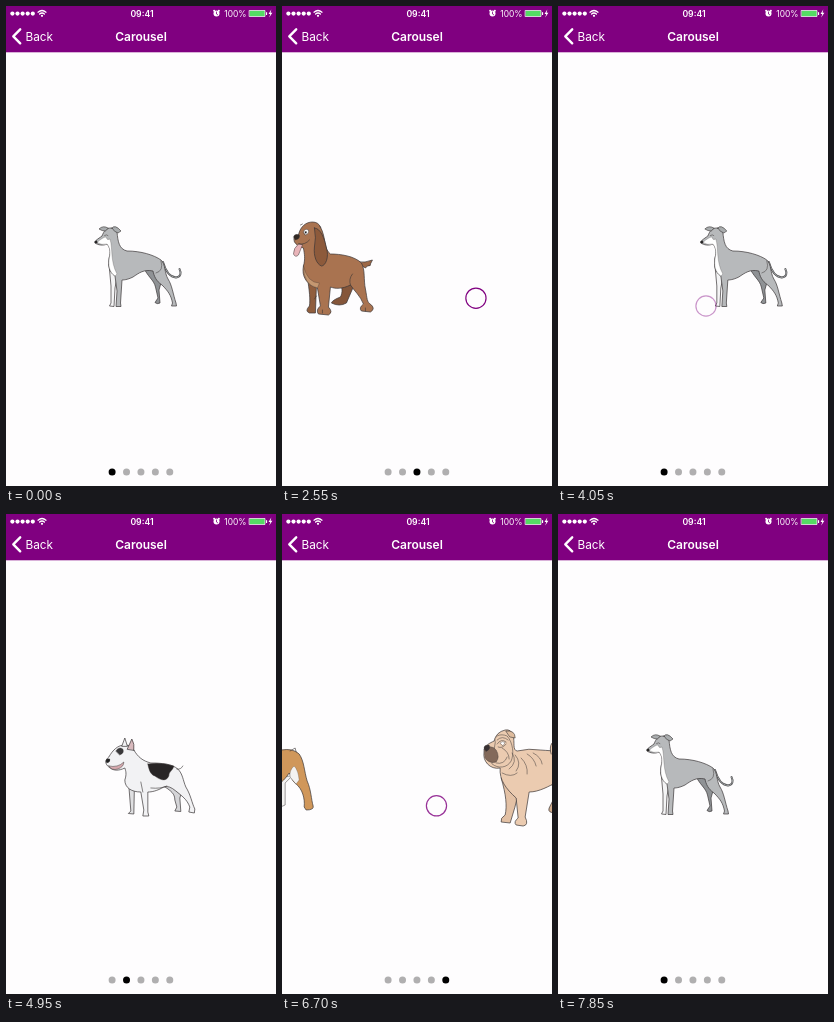
Animation of 270x480 px, one loop 8000 ms. Source, as an HTML page with a canvas:

```html
<!DOCTYPE html>
<html lang="en">
<head>
<meta charset="utf-8">
<title>Carousel</title>
<style>
html, body { margin: 0; width: 100%; height: 100%; overflow: hidden; background: #fefdfe; }
canvas { display: block; width: 100vw; height: 100vh; }
</style>
</head>
<body>
<canvas id="stage"></canvas>
<script>
const W = 270, H = 480, LOOP = 8000;
const PURPLE = '#800080', INK = '#3a3637';
const canvas = document.getElementById('stage');
const ctx = canvas.getContext('2d');

// Each part: [fill, path, line width, line colour]
const greyhound = [
  ['', 'M157 256C159 263 163 271 170 271.5C175 271 175.5 267 173.5 263', 1.9, '#4a4a4c'],
  ['', 'M157 256C159 263 163 271 170 271.5C175 271 175.5 267 173.5 263', .8, '#b4b6b8'],
  ['#f4f4f5', 'M103 258L105 280L105 297L103.5 300L108 300.5L109 282L112 266Z'],
  ['#8f9295', 'M138 262C141 270 148 274 149.5 281L152 292L149 296.5Q151 298.5 154 297L153 284L158 266Z'],
  ['#b7b9bb', 'M111 226C112 236 113 243 121 245C135 245 148 249 155 254C160 259 158 266 162 273C166 279 167 288 170 297L170.5 300L165.5 300L166.5 297C165 289 162 285 156 279C150 275 148 270 147 265C138 263 133 267 127 271C121 274 117 274 116 274L114.5 297L115 300.5L110 300.5L111 285L109 270C103 266 102 260 103 252C105 246 104 241 101 238C97 240 92 239 89 237C88 235 92 233 96 230C98 225 100 222 105 222Q109 222 111 226Z'],
  ['#fff', 'M91 236.5Q97 231 100 231Q101 235 104 233C107 243 104 255 111 268L109 270C103 266 102 259 103.5 251C105 245 103 240 101 238Q96 239.5 91 236.5Z', .25],
  ['#a9acae', 'M102 222Q97 219 93 223Q96 225 99 225Z', .6],
  ['#a9acae', 'M106 222Q109 218 115 225L112 227Q108 226 106 222Z', .6],
  ['#222', 'M89 237Q88 234.5 91 234.8L91.2 237Z', .3],
  ['', 'M98.5 229.5Q100.5 228 102 229.5M155 255Q158 265 150 267', .5]
];

const terrier = [
  ['#dfdfe1', 'M114 272L116 297L113.5 299.5L119 300L119.5 276Z'],
  ['#d5d5d8', 'M147 271C157 277 160 280 160 286L162 293L160 297L166 297.5L165 284L169 271Z'],
  ['#f2f2f4', 'M119 236C123 243 128 247 136 249C147 249 157 250 163 255C168 260 168 266 171 273C176 281 177 289 180 295L179.5 299L174 298L175 293C172 285 167 282 161 277Q154 271 149 273C142 277 137 278 133 278L133 298L134 302L128 302L129 296L126 278C117 278 110 274 110 266C112 260 111 257 110 254C104 257 98 257 94 253C90 250 90 246 94 243C98 236 103 231 110 231Q117 231 119 236Z'],
  ['#f2f2f4', 'M107 232L110 224L112.5 232Z'],
  ['#d8b9bd', 'M112.5 235L117 225Q120 230 119 236Z'],
  ['#282526', 'M133 250Q147 248 159 252C158 257 154 257 154 262C151 269 144 265 140 262C136 261 134 256 133 250Z', .4],
  ['#39383a', 'M101 237Q104 232 108 235Q110 239 105 241Z', .3],
  ['#222', 'M91 247Q91 244 95 245Q96 248 92 249Z', .3],
  ['#d6a8ad', 'M94 252Q103 254 109 248Q109 253 103 255Q97 257 94 252Z', .5],
  ['', 'M162 255Q166 256 168 252M136 274Q146 275 152 272M126 268L128 278', .6]
];

const spaniel = [
  ['#905e3e', 'M112 272C114 285 115 294 114 300Q109 305 114 307L120 307L121 280Z'],
  ['#85563a', 'M143 276C148 281 147 287 145 291Q137 294 136 297Q144 301 151 297L157 283L160 273Z'],
  ['#9d6846', 'M162 256Q170 257 177 254L175 258Q176 260 172 260L170 262L167 260Z'],
  ['#a97350', 'M125 221C131 232 128 243 135 248C145 248 159 250 166 257C170 264 168 274 170 283C172 293 171 296 176 299Q180 303 175 306L166 305Q163 302 168 298C165 290 159 285 155 279C147 283 140 283 135 281L133 301Q138 306 133 309L123 308Q120 304 125 300L122 282C111 279 106 270 108 260C110 253 109 248 108 242Q102 241 99 236Q97 230 103 229C105 220 111 216 117 216Q123 216 125 221Z'],
  ['#c49770', 'M108 260Q112 277 124 277L122 282Q108 279 108 260Z', .3],
  ['#8d5a3b', 'M119 222C125 222 129 232 131 242C134 251 130 260 126 260C121 258 118 250 119 241Q121 232 119 222Z'],
  ['#e9b4b9', 'M103 238Q98 242 98 248Q100 252 103 249L107 239Z', .5],
  ['#302824', 'M98 231Q99 227 104 229Q105 233 100 234Z', .3],
  ['#fff', 'M108 226Q109 222 113 224Q114 228 110 229Z', .5],
  ['#222', 'M109.5 225.5h1.6v1.8h-1.6Z', .2],
  ['', 'M103 238Q110 239 114 234M105 219L107 218M155 279Q153 273 157 268M127 304v3M170 302v3M121 290l-2 3', .6]
];

const bulldog = [
  ['#efedeb', 'M104 268L107 291L104 297L112 298L115 274Z'],
  ['#f3f2f1', 'M144 264L147 290L145 294L152 291L152 269L159 262Z', .5],
  ['#d0975a', 'M123 226C126 235 134 236 148 236Q160 234 166 240C171 247 171 257 174 267C178 276 178 285 180 292Q181 296 173 296L171 293C172 284 169 275 163 270C158 266 158 262 156 259C149 270 140 275 131 274L130 297L131 300L121 300L123 293L119 274C107 274 102 266 102 256L103 249C94 248 91 242 94 235C96 225 104 220 113 220Q120 220 123 226Z'],
  ['#f3f2f1', 'M95 236Q102 228 105 232L110 243Q117 253 112 265L123 293L121 300L131 300L131 274Q107 278 102 258L103 249Q91 248 95 236Z', .4],
  ['#f3f2f1', 'M157 263Q156 256 161 252Q165 256 166 266L163 270Z', .25],
  ['#a86c37', 'M113 221Q122 219 124 228Q118 231 113 221Z'],
  ['#292526', 'M94 235Q98 231 100 235L97 238Z', .3],
  ['', 'M95 242Q104 239 108 244M104 229h3M157 237L162 234L163 238', .6]
];

const sharpei = [
  ['#e3c1a5', 'M98 264C103 281 104 292 102 301Q97 304 98 308L107 309Q112 294 116 276Z'],
  ['#d3ae8f', 'M143 267C151 270 153 277 150 286L146 294Q144 299 153 299L160 279L164 264Z'],
  ['#ebcbb0', 'M110 221C112 229 109 236 114 237Q126 234 137 236C150 237 168 237 175 246C181 256 178 270 182 281C185 291 183 301 189 307Q190 312 179 311L178 306C179 294 174 284 166 277Q160 270 154 268C146 272 136 278 126 278L122 303Q126 311 120 312L113 311Q110 308 115 304L113 284C103 275 96 266 97 254C87 256 79 247 81 238C81 231 87 229 91 227Q93 218 102 216Q108 215 110 221Z'],
  ['#ebcbb0', 'M148 240C145 231 150 225 157 225C165 226 167 237 160 241Q152 242 151 236Q152 231 157 233L159 236'],
  ['#ebcbb0', 'M92 228C90 222 97 219 104 222C110 229 111 240 108 247C104 254 95 255 89 250Z', .5],
  ['#83695a', 'M81 235Q88 230 93 236Q97 243 93 248Q86 250 82 244Z', .4],
  ['#383132', 'M81 235Q80 230.5 86 231Q88 235 83 237.5Z', .3],
  ['#dfbc9e', 'M103 217Q112 216 112 224L107 223Z', .6],
  ['', 'M94 230Q98 224 103 228M95 233Q99 235 103 230M94 226Q99 221 105 226M99 234Q106 238 106 245M93 249Q101 251 104 243M109 239Q115 248 106 255M112 241Q119 249 113 257M124 240Q131 244 133 252M130 239Q138 243 139 250M118 244Q125 251 124 260M99 259Q108 264 114 259', .5],
  ['#fff', 'M97 229Q99 226.5 102 228.5L100 231.5Z', .4]
];

const dogs = [greyhound, terrier, spaniel, bulldog, sharpei].map(parts =>
  parts.map(([fill, d, width = .7, line = INK]) => ({ fill, path: new Path2D(d), width, line })));

// Swipe: drag start time, press lead, then end point of the finger
const swipes = [
  [1010, 100, 148, 300], [1740, 40, 148, 300], [2445, 60, 147, 302], [3150, 60, 145, 311], [3853, 60, 148, 300],
  [4630, 20, 150, 296], [5274, 25, 150, 294], [5917, 25, 152, 293], [6562, 25, 153, 292], [7380, 5, 150, 296]
];
const DRAG = 140, DRAGGED = 151, TAU = 75;

// Distance scrolled u ms after the drag starts: pull, then decay onto the page
function travel(u) {
  if (u <= 0) return 0;
  if (u < DRAG) return DRAGGED * (u / DRAG) ** 2;
  return W - Math.max(0, (W - DRAGGED + 2) * Math.exp((DRAG - u) / TAU) - 2);
}

function disc(x, y, r, color) {
  ctx.fillStyle = color;
  ctx.beginPath();
  ctx.arc(x, y, r, 0, 7);
  ctx.fill();
}

function stroke(path, width, color) {
  ctx.lineWidth = width;
  ctx.strokeStyle = color;
  ctx.stroke(path);
}

function text(s, x, y, size, weight, align) {
  ctx.font = `${weight} ${size}px Inter, Roboto, sans-serif`;
  ctx.textAlign = align;
  ctx.fillText(s, x, y);
}

function drawDog(i, x) {
  ctx.save();
  ctx.translate(x, 0);
  for (const { fill, path, width, line } of dogs[i]) {
    if (fill) {
      ctx.fillStyle = fill;
      ctx.fill(path);
    }
    stroke(path, width, line);
  }
  ctx.restore();
}

const chevron = new Path2D('M14.2 23.3L7.3 30.3L14.2 37.3');
const wifi = new Path2D('M32 6.2Q36 2.8 40 6.2M33.6 8Q36 5.9 38.4 8');
const battery = new Path2D('M243.5 4.5h15.5v6h-15.5Z');
const bolt = new Path2D('M265.3 3.5L262.5 8h1.8L263.2 11.5L266.4 6.8h-1.8Z');
const alarm = new Path2D('M210.5 6v2l1.2 .8');

function drawHeader() {
  ctx.fillStyle = PURPLE;
  ctx.fillRect(0, 0, W, 46.3);
  for (let i = 0; i < 5; i++) disc(6.4 + i * 5.1, 7.6, 2.1, '#fff');
  stroke(wifi, 1.3, '#fff');
  disc(36, 9.8, 1.1, '#fff');
  disc(210.5, 7.6, 3, '#fff');
  disc(208.1, 4.8, 1, '#fff');
  disc(212.9, 4.8, 1, '#fff');
  stroke(alarm, .8, PURPLE);
  ctx.fillStyle = '#fff';
  text('09:41', 136, 10.7, 8.7, 600, 'center');
  text('100%', 240.5, 10.7, 8.4, 400, 'right');
  text('Back', 19.5, 34.8, 11.8, 400, 'left');
  text('Carousel', 135, 34.8, 12, 600, 'center');
  ctx.fill(bolt);
  ctx.fillRect(260, 6.2, 1.1, 2.8);
  ctx.fillStyle = '#55da64';
  ctx.fill(battery);
  stroke(battery, .7, '#fff');
  stroke(chevron, 2.4, '#fff');
}

function drawRing(t) {
  for (const [start, lead, x, y] of swipes) {
    const u = t - start;
    if (u < -lead || u > 260) continue;
    const p = Math.min(1, Math.max(0, u / DRAG)) ** 2;
    ctx.globalAlpha = Math.min(1, (260 - u) / 150);
    ctx.lineWidth = 1.2;
    ctx.strokeStyle = PURPLE;
    ctx.beginPath();
    ctx.arc(257 + (x - 257) * p, 279 + (y - 279) * p, 10.1, 0, 7);
    ctx.stroke();
    ctx.globalAlpha = 1;
  }
}

function draw(t) {
  ctx.fillStyle = '#fefdfe';
  ctx.fillRect(0, 0, W, H);
  const pos = swipes.reduce((sum, [start]) => sum + travel(t - start), 0) / W;
  const page = Math.floor(pos), shift = (pos - page) * W;
  drawDog(page % 5, -shift);
  if (shift > 0) drawDog((page + 1) % 5, W - shift);
  const active = Math.round(pos) % 5;
  for (let i = 0; i < 5; i++) disc(106.1 + i * 14.42, 466, 3.5, i === active ? '#000' : '#b0afb0');
  drawRing(t);
  drawHeader();
}

function resize() {
  const dpr = window.devicePixelRatio || 1;
  canvas.width = Math.round(innerWidth * dpr);
  canvas.height = Math.round(innerHeight * dpr);
  ctx.setTransform(canvas.width / W, 0, 0, canvas.height / H, 0, 0);
  ctx.lineJoin = ctx.lineCap = 'round';
}

addEventListener('resize', resize);
resize();
const begin = performance.now();
function frame() {
  draw((performance.now() - begin) % LOOP);
  requestAnimationFrame(frame);
}
frame();
</script>
</body>
</html>
```
